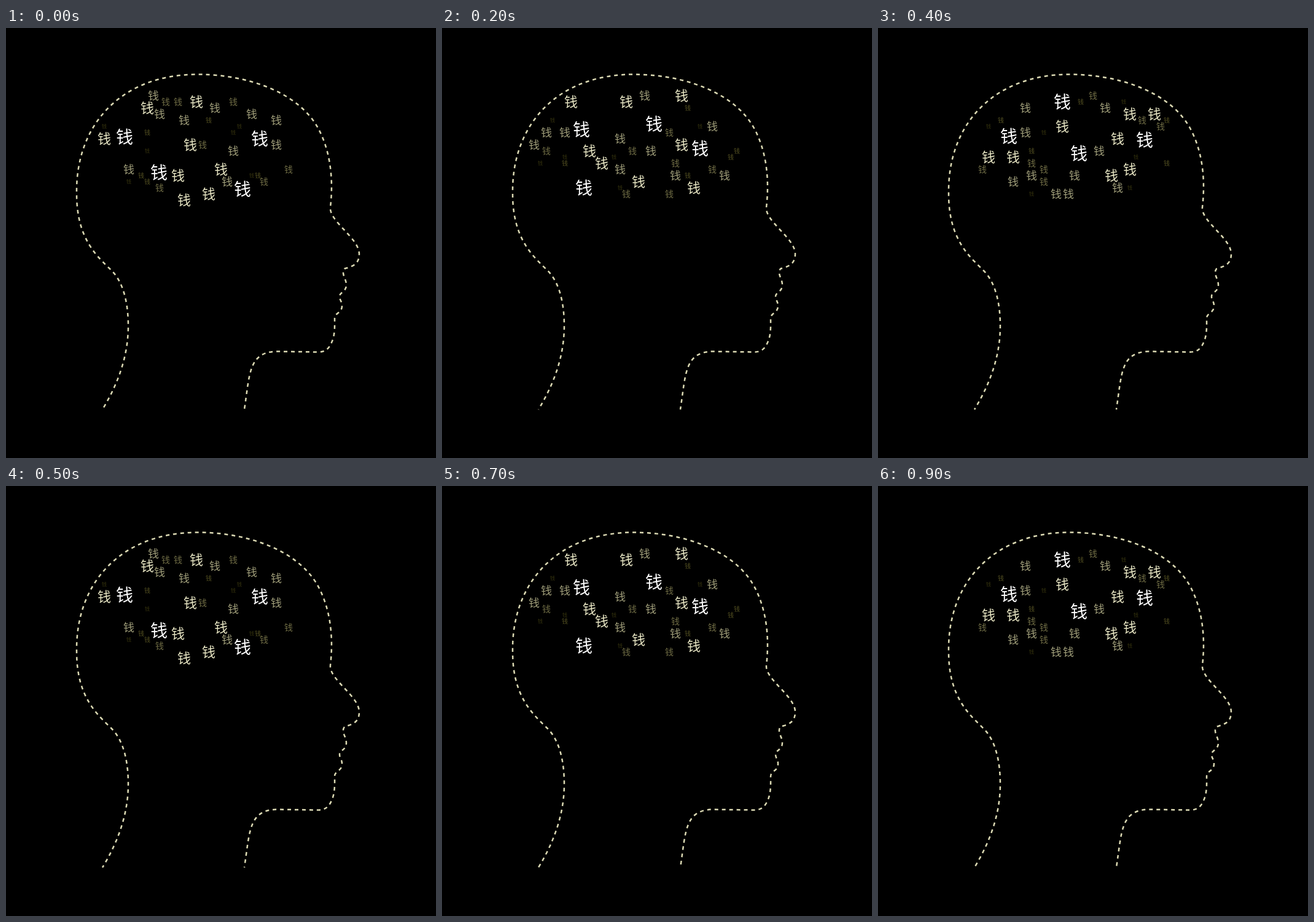
Animation of 700 by 700 pixels, one loop 1 s. Source, as an HTML page:

```html
<!DOCTYPE html>
<html lang="zh-CN">
<head>
<meta charset="utf-8">
<title>Head of glyphs</title>
<style>
  html, body { margin: 0; width: 100%; height: 100%; overflow: hidden; background: #000; }
  svg { display: block; width: 100vw; height: 100vh; }
  text { font-family: "Noto Sans CJK SC", "Noto Sans CJK", sans-serif; text-anchor: middle; }
</style>
</head>
<body>
<svg id="stage" viewBox="0 0 700 700">
  <path id="head" fill="none" stroke="#dcdab4" stroke-width="2.5" d="
    M157 621 C185 575 199 530 199 485 C199 450 192 415 172 395
    C150 373 115 345 115 270 C113 158 187 75.5 312 75.5
    C390 75.5 475 103 508 163 C526 196 534 240 528 292
    C526 315 575 342 575 368 C575 388 558 389 551 392
    C545 400 554 408 554 418 C554 430 543 430 543 437
    C543 443 547 445 547 452 C547 465 535 463 535 473
    C535 483 536 500 530 512 C525 524 518 527.5 508 527.5
    L440 526.5 C395 528 397 562 388 621"/>
</svg>
<script>
const LOOP = 1000, STEP = 100;
const PERIOD = 12, DASH = 6, PHASE = 4;
const stage = document.getElementById('stage');
const head = document.getElementById('head');

// Fit the dash count so that both neck ends meet the pattern at the right phase.
const rest = PERIOD - 0.8;
const dashes = Math.round((head.getTotalLength() - rest) / PERIOD);
head.setAttribute('pathLength', dashes * PERIOD + rest);
head.setAttribute('stroke-dasharray', `${DASH} ${PERIOD - DASH}`);

// From near to far.
const depths = [
  { size: 28, count: 4, fill: '#ffffff' },
  { size: 22, count: 8, fill: '#e6e4c2' },
  { size: 18, count: 10, fill: '#9e9c78' },
  { size: 14, count: 7, fill: '#706d45' },
  { size: 10, count: 5, fill: '#504d20' },
  { size: 8, count: 6, fill: '#37350e' }
];

// Nearest glyphs of each swarm; the others are scattered around them.
const anchors = [
  [[193, 177], [413, 180], [249, 235], [385, 262]],
  [[223, 186], [393, 160], [335, 212], [219, 255]],
  [[227, 165], [345, 156], [420, 196], [231, 260]],
  [],
  [[300, 120], [213, 176], [327, 204], [434, 182]]
];

function add(tag, attrs, parent) {
  const el = document.createElementNS('http://www.w3.org/2000/svg', tag);
  for (const key in attrs) el.setAttribute(key, attrs[key]);
  return parent.appendChild(el);
}

function seeded(seed) {
  return () => {
    seed = (seed + 0x6D2B79F5) | 0;
    let t = Math.imul(seed ^ (seed >>> 15), seed | 1);
    t ^= t + Math.imul(t ^ (t >>> 7), t | 61);
    return ((t ^ (t >>> 14)) >>> 0) / 2 ** 32;
  };
}

// Random grid points inside a rounded brain shape, clear of earlier glyphs.
function scatter(near, random) {
  const placed = [];
  const clear = (x, y, size) => placed.every(p =>
    Math.hypot(p.x - x, p.y - y) > (p.size + size) * 0.55);
  const inside = (u, v) => Math.abs(u) ** 2.3 + Math.abs(v) ** 2.3 < 1;

  for (const { size, count, fill } of depths) {
    const keys = size === depths[0].size ? near : [];
    for (const [x, y] of keys) placed.push({ x, y, size, fill });
    let left = count - keys.length;
    for (let tries = 0; left > 0 && tries < 500; tries++) {
      const u = random() * 2 - 1, v = random() * 2 - 1;
      const x = Math.round((316 + 166 * u) / 10) * 10;
      const y = Math.round((190 + 86 * v) / 10) * 10;
      if (!inside(u, v) || !clear(x, y, size)) continue;
      placed.push({ x, y, size, fill });
      left--;
    }
  }
  return placed.reverse();
}

const swarms = anchors.map((near, i) => {
  const group = add('g', {}, stage);
  for (const { x, y, size, fill } of scatter(near, seeded(i + 1))) {
    const attrs = { x, y: y + size * 0.38, 'font-size': size, fill };
    add('text', attrs, group).textContent = '钱';
  }
  return group;
});

function draw(ms) {
  const step = Math.floor((ms % LOOP) / STEP);
  head.setAttribute('stroke-dashoffset', -(PHASE + PERIOD * step * STEP / LOOP));
  swarms.forEach((group, i) => {
    group.style.display = i === step % swarms.length ? '' : 'none';
  });
}

const start = performance.now();
function tick() {
  draw(performance.now() - start);
  requestAnimationFrame(tick);
}
tick();
</script>
</body>
</html>
```
